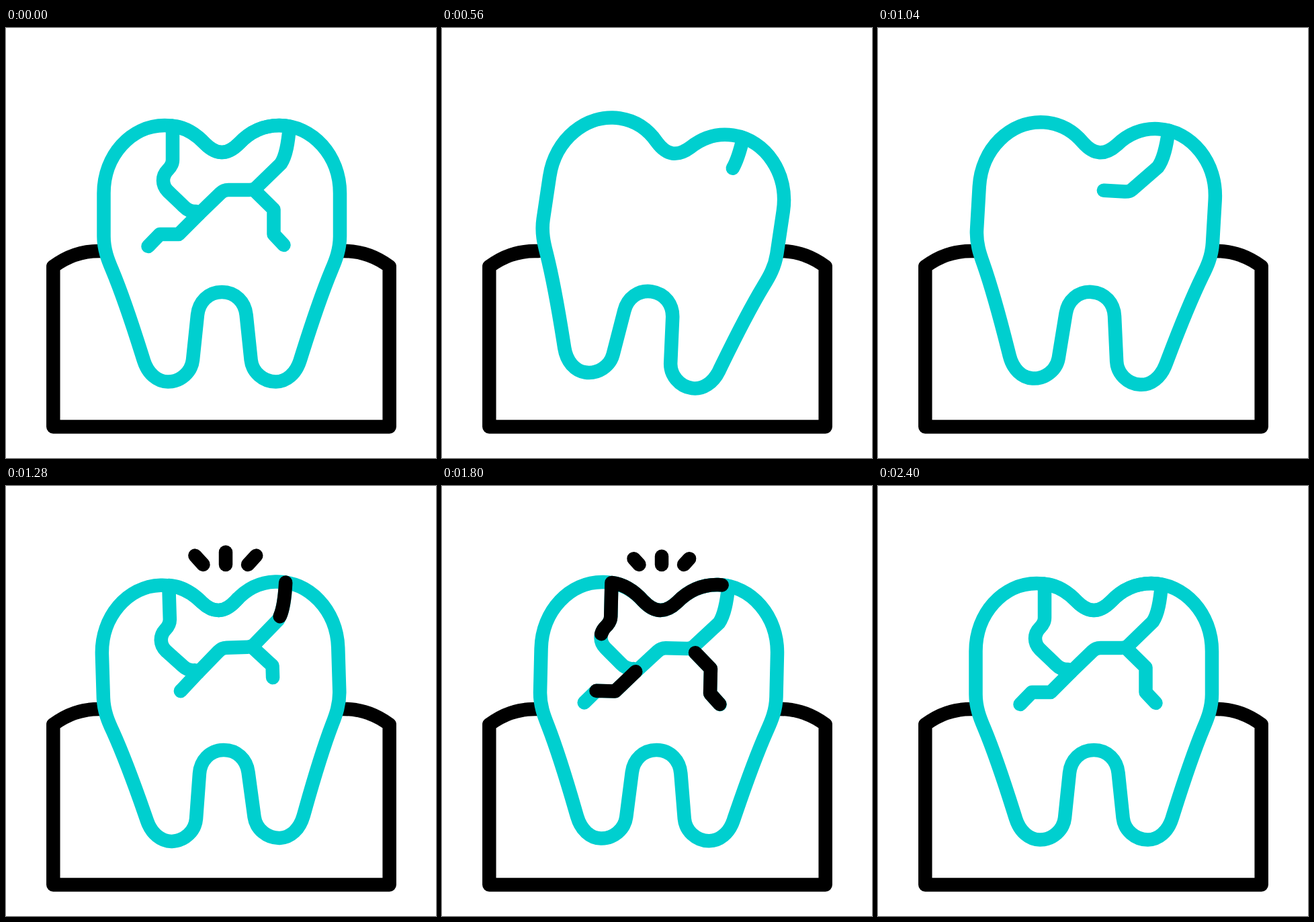
Write an HTML page that moves like this. It is 640x640 px and loops after 3000 ms.

```html
<!DOCTYPE html>
<html lang="en">
<head>
<meta charset="utf-8">
<title>Cracked tooth</title>
<style>
  html, body { margin: 0; width: 100%; height: 100%; overflow: hidden; background: #fff; }
  svg { display: block; width: 100%; height: 100%; }
  path { fill: none; stroke-width: 20.5; stroke-linecap: round; stroke-linejoin: round; }
  .cyan { stroke: #00cfcf; }
  .black { stroke: #000; }
  .body { fill: #fff; }
</style>
</head>
<body>
<svg viewBox="0 0 640 640">
  <path class="black" d="M143 332C118 331 93 338 70.3 355V593.5H570.7V355C548 338 523 331 498 332"/>
  <g id="tooth">
    <path class="cyan body" d="M321.3 185C312 185 304 180 296 172C281 156 262 145 236 145C186 145 145.5 190 145.5 246V310
      C145.5 330 152 346 158 360C178 408 193 457 205 495C211 514 225 526.5 241 526.5C260 526.5 276 512 278 494L285 427
      C287 408 301 393 321.3 393C341.6 393 355.6 408 357.6 427L364.6 494C366.6 512 382.6 526.5 401.6 526.5
      C417.6 526.5 431.6 514 437.6 495C449.6 457 464.6 408 484.6 360C490.6 346 497 330 497 310V246
      C497 190 456.6 145 406.6 145C380.6 145 361.6 156 346.6 172C338.6 180 330.6 185 321.3 185Z"/>
  </g>
  <g id="rays"></g>
</svg>
<script>
const LOOP = 3000, STEP = 40;
const tooth = document.getElementById('tooth');
const rays = document.getElementById('rays');

const chip = 'M422 146.6C420 170 417 190 409 202L373 237Q369 241 362 241H331Q324 241 319 246L287 277L283 273' +
  'Q273 274 265 266L241 243Q234 236 234 227Q234 218 241 211Q248 204 248 196V145.6C268 147.5 283 158 296 172' +
  'C304 180 312 185 321.3 185C330.6 185 338.6 180 346.6 172C361.6 156 380.6 145 406.6 145Q414 145 422 146.6';
const leftBranch = 'M287 277L257 307H229L211.5 325';
const rightBranch = 'M369 241L398.5 270V307L413.5 323';

function addPath(parent, d, className) {
  const path = document.createElementNS('http://www.w3.org/2000/svg', 'path');
  path.setAttribute('d', d);
  path.setAttribute('class', className);
  path.setAttribute('pathLength', 1);
  return parent.appendChild(path);
}

// Eased progress from 0 to 1 between two times
function ease(t, from, to) {
  const u = Math.min(1, Math.max(0, (t - from) / (to - from)));
  return (1 - Math.cos(Math.PI * u)) / 2;
}

function trim(path, start, end) {
  path.style.display = end - start > 0.0005 ? '' : 'none';
  path.style.strokeDasharray = `${end - start} 2`;
  path.style.strokeDashoffset = -start;
}

// erase / draw: cyan crack; head / tail: black streak
const cracks = [
  { d: chip, erase: [40, 680], draw: [840, 1420], head: [1140, 1860], tail: [1420, 2170] },
  { d: leftBranch, erase: [120, 460], draw: [1160, 1440], head: [1530, 1940], tail: [1820, 2385] },
  { d: rightBranch, erase: [240, 540], draw: [1080, 1440], head: [1400, 1820], tail: [1680, 2320] }
];
for (const c of cracks) c.cyan = addPath(tooth, c.d, 'cyan');
for (const c of cracks) c.black = addPath(tooth, c.d, 'black');

const rayPaths = ['M293.5 117L245 63.5', 'M327 117V43', 'M360 117L409 63.5']
  .map(d => addPath(rays, d, 'black'));

// Decaying swing: [time, degrees]
const swing = [[0, 0], [265, -8.5], [555, 8.5], [845, -4.2], [1085, 4], [1325, -2.3], [1640, 2.3], [2000, 0]];

function swingAngle(t) {
  let angle = 0;
  for (let i = 1; i < swing.length; i++) {
    const [from, a] = swing[i - 1], [to, b] = swing[i];
    angle += (b - a) * ease(t, from, to);
  }
  return angle;
}

function frame(now) {
  const t = Math.floor(now % LOOP / STEP) * STEP;
  tooth.setAttribute('transform', `rotate(${swingAngle(t)} 321.3 332)`);
  for (const c of cracks) {
    trim(c.cyan, 0, 1 - ease(t, ...c.erase) + ease(t, ...c.draw));
    trim(c.black, ease(t, ...c.tail), ease(t, ...c.head));
  }
  const burst = t < 1700 ? t - 1180 : t - 1720;
  for (const ray of rayPaths) trim(ray, ease(burst, 190, 460), ease(burst, 0, 300));
  requestAnimationFrame(frame);
}
requestAnimationFrame(frame);
</script>
</body>
</html>
```
